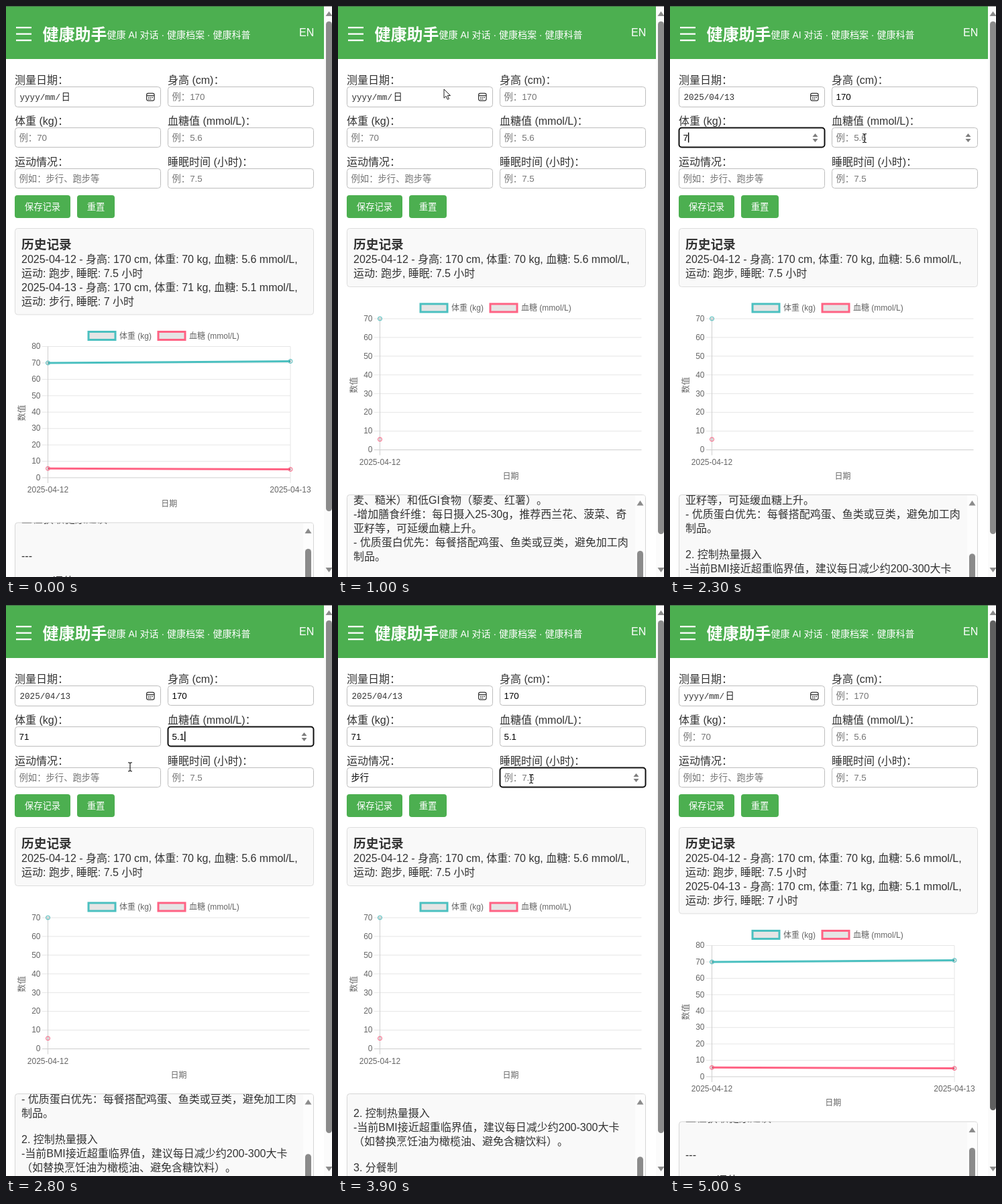
These frames come from a looping animation (486x851 px, 5200 ms). An HTML page:

```html
<!DOCTYPE html>
<html lang="zh-CN">
<head>
<meta charset="utf-8">
<title>健康助手</title>
<style>
html, body { margin: 0; width: 100%; height: 100%; overflow: hidden; background: #fff; }
svg { display: block; font-family: "Liberation Sans", Arial, "Noto Sans CJK SC", "Noto Sans CJK", sans-serif; }
text { white-space: pre; text-spacing-trim: space-all; }
.mono { font-family: "Liberation Mono", "Noto Sans CJK SC", monospace; }
</style>
</head>
<body>
<svg id="stage" width="486" height="851" viewBox="0 0 486 851"></svg>
<script>
const LOOP = 5200, SAVED = 4400;
const GREEN = '#4CAF50', TEAL = '#4BC0C0', PINK = '#FF6384';
const stage = document.getElementById('stage');

function add(parent, tag, attrs = {}, content) {
  const node = document.createElementNS('http://www.w3.org/2000/svg', tag);
  for (const key in attrs) node.setAttribute(key, attrs[key]);
  if (content !== undefined) node.textContent = content;
  parent.appendChild(node);
  return node;
}
const group = (parent, attrs) => add(parent, 'g', attrs);
const box = (parent, x, y, width, height, fill, more) =>
  add(parent, 'rect', { x, y, width, height, fill, ...more });
const text = (parent, x, y, str, size = 16, fill = '#333', more) =>
  add(parent, 'text', { x, y, 'font-size': size, fill, ...more }, str);
const path = (parent, d, fill, more) => add(parent, 'path', { d, fill, ...more });
const line = (parent, x1, y1, x2, y2, stroke, width = 1) =>
  add(parent, 'line', { x1, y1, x2, y2, stroke, 'stroke-width': width });
const show = (node, on) => node.setAttribute('display', on ? 'inline' : 'none');
const move = (node, x, y) => node.setAttribute('transform', `translate(${x} ${y})`);
const up = (parent, x, y, w, h, fill) => path(parent, `M${x - w} ${y + h}L${x} ${y}L${x + w} ${y + h}Z`, fill);
const down = (parent, x, y, w, h, fill) => path(parent, `M${x - w} ${y}L${x} ${y + h}L${x + w} ${y}Z`, fill);

// Page header
box(stage, 0, 0, 486, 851, '#fff');
const page = group(stage);
box(page, 0, -2, 474, 81, GREEN);
for (const y of [31, 40.5, 50]) box(page, 15, y, 23, 2.3, '#fff');
text(page, 54.5, 50.5, '健康助手', 24, '#fff', { 'font-weight': 'bold' });
text(page, 150.5, 48, '健康 AI 对话 · 健康档案 · 健康科普', 14, '#fff');
text(page, 437, 45, 'EN', 16, '#fff');

// Form fields
const SMALL = 13.333;
function field(x, y, height, label, hint, spin) {
  const mid = y + height / 2;
  text(page, x, y - 4, label);
  box(page, x + .5, y + .5, 217, height - 1, '#fff', { rx: 4, stroke: '#bdbdbd' });
  const value = text(page, x + 6.5, mid + 4.5, hint, SMALL);
  const ring = box(page, x + .5, y + .5, 217, height - 1, 'none', { rx: 4, stroke: '#101010', 'stroke-width': 2 });
  const caret = box(page, 0, mid - 7.5, 1.4, 15, '#000');
  const arrows = group(page);
  if (spin) {
    box(arrows, x + 199, y + 3, 12, height - 6, '#fff');
    up(arrows, x + 203.5, mid - 6, 4, 5, '#7d7d7d');
    down(arrows, x + 203.5, mid + 2, 4, 5, '#7d7d7d');
  }
  return { x, hint, value, ring, caret, arrows };
}
const date = field(13, 120, 31, '测量日期：', '');
date.value.setAttribute('class', 'mono');
date.value.setAttribute('font-size', 12.6);
date.value.setAttribute('x', 20.5);
date.value.setAttribute('y', 139.5);
date.value.setAttribute('fill', '#333');
const dayHint = text(page, 82.5, 140, '日', SMALL, '#222');
const icon = group(page, { stroke: '#333', fill: 'none', 'stroke-width': 1.2 });
box(icon, 209.6, 130.1, 11.5, 11, 'none', { rx: 2.5 });
path(icon, 'M209.6 133.6h11.5M212 136.3h1.6M214.7 136.3h1.6M217.4 136.3h1.6M212 138.7h1.6M214.7 138.7h1.6', 'none');

const height = field(241, 120, 30, '身高 (cm)：', '例：170', true);
const weight = field(13, 181, 30, '体重 (kg)：', '例：70', true);
const sugar = field(241, 181, 30, '血糖值 (mmol/L)：', '例：5.6', true);
const sport = field(13, 242, 30, '运动情况：', '例如：步行、跑步等');
const sleep = field(241, 242, 30, '睡眠时间 (小时)：', '例：7.5', true);
const dots = line(page, 20, 263.5, 35, 263.5, '#333');
dots.setAttribute('stroke-dasharray', '1.5 1.5');

for (const [x, w, label] of [[13, 83, '保存记录'], [106, 56, '重置']]) {
  box(page, x, 282, w, 34, GREEN, { rx: 4 });
  text(page, x + w / 2, 304, label, SMALL, '#fff', { 'text-anchor': 'middle' });
}

// History, chart and advice panel for one set of records
const GAP = 18, ROW = 21;
const clips = add(stage, 'defs');
function report({ id, history, shift, max, right, names, weights, sugars, advice, first }) {
  const g = group(page);
  box(g, 13.5, 331.5, 445, 87 + shift, '#f9f9f9', { rx: 4, stroke: '#ddd' });
  text(g, 23, 362, '历史记录', 18.72, '#333', { 'font-weight': 'bold' });
  history.forEach((str, i) => text(g, 23, 383.3 + i * 20.8, str));

  const chart = group(g);
  move(chart, 0, shift);
  const grey = '#666', mid = { 'text-anchor': 'middle' };
  for (const [x, color, label] of [[122, TEAL, '体重 (kg)'], [226, PINK, '血糖 (mmol/L)']]) {
    box(chart, x + 1, 444, 40, 12, '#e5e5e5', { stroke: color, 'stroke-width': 3 });
    text(chart, x + 47, 454, label, 12, grey);
  }
  const base = 661.5, top = 466, left = 62.5;
  const yOf = v => base - v * (base - top) / max;
  for (let v = 0; v <= max; v += 10) {
    const y = yOf(v);
    line(chart, 54, y, right, y, v ? '#e6e6e6' : '#cfcfcf');
    text(chart, 51.5, y + 3.8, v, 12, grey, { 'text-anchor': 'end' });
  }
  line(chart, left, top, left, base + 8, '#cfcfcf');
  const xs = [left, 424];
  if (names.length > 1) line(chart, 424, top, 424, base + 8, '#e6e6e6');
  names.forEach((name, i) => text(chart, xs[i], 683.5, name, 12, grey, mid));
  text(chart, (left + right) / 2, 704.5, '日期', 12, grey, mid);
  text(chart, 0, 0, '数值', 12, grey, { ...mid, transform: 'translate(27.5 565) rotate(-90)' });
  for (const [color, values] of [[PINK, sugars], [TEAL, weights]]) {
    if (values.length > 1) line(chart, xs[0], yOf(values[0]), xs[1], yOf(values[1]), color, 3);
    values.forEach((v, i) => add(chart, 'circle',
      { cx: xs[i], cy: yOf(v), r: 3, fill: 'rgba(0,0,0,.1)', stroke: color }));
  }

  const panelTop = 728 + shift;
  box(g, 13.5, panelTop + .5, 445, 220, '#f9f9f9', { rx: 4, stroke: '#d6d6d6' });
  box(g, 443, panelTop + 1.5, 14.5, 200, '#fdfdfd');
  up(g, 450.5, panelTop + 9, 5, 7.5, '#8b8b8b');
  const thumb = box(g, 446, 0, 9, 200, '#8b8b8b', { rx: 4.5 });
  box(add(clips, 'clipPath', { id }), 14, panelTop + 1, 429, 200);
  const scroller = group(group(g, { 'clip-path': `url(#${id})` }));
  let y = first;
  for (const str of advice) {
    const h = /[^\x00-\x7f]/.test(str) ? ROW : GAP;
    if (str) text(scroller, 23, y + h / 2 + 5.6, str);
    y += h;
  }
  return { g, thumb, scroller };
}
const day1 = ['2025-04-12 - 身高: 170 cm, 体重: 70 kg, 血糖: 5.6 mmol/L,', '运动: 跑步, 睡眠: 7.5 小时'];
const day2 = ['2025-04-13 - 身高: 170 cm, 体重: 71 kg, 血糖: 5.1 mmol/L,', '运动: 步行, 睡眠: 7 小时'];
const before = report({
  id: 'clipA', history: day1, shift: 0, max: 70, right: 452.5,
  names: ['2025-04-12'], weights: [70], sugars: [5.6], first: 683.5,
  advice: [
    '1. 优化饮食结构',
    '- 选择低升糖主食：用全谷物代替精米白面（如燕',
    '麦、糙米）和低GI食物（藜麦、红薯）。',
    '-增加膳食纤维：每日摄入25-30g，推荐西兰花、菠菜、奇',
    '亚籽等，可延缓血糖上升。',
    '- 优质蛋白优先：每餐搭配鸡蛋、鱼类或豆类，避免加工肉',
    '制品。',
    '',
    '2. 控制热量摄入',
    '-当前BMI接近超重临界值，建议每日减少约200-300大卡',
    '（如替换烹饪油为橄榄油、避免含糖饮料）。',
    '',
    '3. 分餐制',
    '- 采用少食多餐的方式，避免一次进食过量'
  ]
});
const after = report({
  id: 'clipB', history: day1.concat(day2), shift: 41.5, max: 80, right: 424,
  names: ['2025-04-12', '2025-04-13'], weights: [70, 71], sugars: [5.6, 5.1], first: 774.5,
  advice: ['正在获取健康建议...', '', '', '---', '', '1. BMI评估']
});

// Window scrollbar and edge
box(stage, 474, 0, 12, 851, '#fbfbfb');
up(stage, 481.5, 8, 5, 7, '#8b8b8b');
down(stage, 481.5, 837, 5, 7, '#8b8b8b');
const bar = box(stage, 477, 23, 9, 730, '#8b8b8b', { rx: 4.5 });
box(stage, 0, 0, 486, 1, '#444', { opacity: .6 });

// Candidate window of the input method, above everything but the pointer
const ime = group(stage);
for (let i = 4; i > 0; i--) box(ime, 19 - i, 266 - i, 500, 34 + i * 2, '#000', { rx: 8 + i, opacity: .06 });
box(ime, 19, 264.5, 500, 34.5, '#2b2b2b', { rx: 7 });
box(ime, 24, 269, 62, 27, '#3a3a3a', { rx: 4 });
box(ime, 24, 274.5, 3, 16, '#4cc2d8', { rx: 1.5 });
[...'不步部补 布卜'].forEach((char, i) => {
  const x = 35 + i * 66.2;
  text(ime, x, 289, i + 1, 15, '#eee');
  text(ime, x + 13, 289, char, 15, '#eee');
});
path(ime, 'M317.5 282a5 5.5 0 0 1 10 0q-.5 3 2 4.500q1 4 -3 4q-4 1.500 -8 0q-4 0 -3 -4q2.500 -1.500 2 -4.500Z', '#ee7f3b');

// Pointers
const arrow = group(stage);
path(arrow, 'M0 0V13.2L3.1 10.3L5.3 15.3L7.5 14.3L5.3 9.5H9.5Z', '#fff', { stroke: '#222', 'stroke-linejoin': 'round' });
const beam = group(stage);
path(beam, 'M-3 -6.5Q0 -6.5 0 -5V5Q0 6.5 -3 6.5M3 -6.5Q0 -6.5 0 -5M0 5Q0 6.5 3 6.5', 'none', { stroke: '#222', 'stroke-width': 1.2 });

// Timelines: [time, value]
const typed = [
  [height, [[1600, '1'], [1700, '17'], [1800, '170']]],
  [weight, [[2300, '7'], [2400, '71']]],
  [sugar, [[2600, '5'], [2700, '5.'], [2800, '5.1']]],
  [sport, [[3200, 'bu'], [3500, '步行']]],
  [sleep, [[4000, '7']]]
];
const dates = [[0, 'yyyy/mm/'], [1300, '2025/mm/'], [1400, '2025/04/'], [1500, '2025/04/13'], [SAVED, 'yyyy/mm/']];
const focus = [[0, null], [1600, height], [2000, weight], [2500, sugar], [2900, sport], [3800, sleep], [4200, null]];
const scroll = [[0, -21], [300, 0], [1400, 21], [2100, 42], [2600, 63], [2900, 84], [3200, 100], [3300, 102]];
const track = [
  [600, 300, 330], [800, 158, 124], [1000, 158, 124], [1300, 40, 132], [1500, 60, 134], [1600, 300, 136], [1800, 300, 136],
  [2000, 90, 197], [2200, 290, 197], [2500, 290, 197], [2900, 150, 256], [3100, 203.5, 261.5], [3500, 203.5, 261.5],
  [3800, 288, 259], [4000, 288, 259], [4200, 60, 300], [4600, 60, 300], [4700, 243.5, 440], [4800, 243.5, 440]
];
const last = (steps, t, none) => steps.reduce((v, s) => s[0] <= t ? s[1] : v, none);

function pointer(t) {
  const on = t >= track[0][0] && t < 4900;
  let i = 0;
  while (i < track.length - 2 && track[i + 1][0] <= t) i++;
  const [a, ax, ay] = track[i], [b, bx, by] = track[i + 1];
  const k = Math.min(1, Math.max(0, (t - a) / (b - a)));
  const x = ax + (bx - ax) * k, y = ay + (by - ay) * k;
  const inField = (t >= 1600 && t < 1900) || (t >= 2000 && t < 3100) || (t >= 3600 && t < 4100);
  show(arrow, on && !inField);
  show(beam, on && inField);
  move(arrow, x, y);
  move(beam, x, y);
}

function render(time) {
  const t = Math.floor(time % LOOP / 100) * 100;
  const saved = t < 100 || t >= SAVED;
  const active = last(focus, t);

  date.value.textContent = last(dates, t);
  show(date.ring, t >= 1200 && t < 1600);
  show(date.caret, false);
  show(dayHint, t < 1500 || saved);

  for (const [f, steps] of typed) {
    const value = saved ? '' : last(steps, t, '');
    const on = f === active;
    f.value.textContent = value || f.hint;
    f.value.setAttribute('fill', value ? '#000' : '#757575');
    show(f.ring, on);
    show(f.caret, on && value);
    if (on && value) f.caret.setAttribute('x', f.x + 6.5 + f.value.getComputedTextLength());
    show(f.arrows, on || (f === sugar && t >= 2200 && t < 2900));
  }
  const composing = t >= 3200 && t < 3500;
  show(ime, composing);
  show(dots, composing);

  show(before.g, !saved);
  show(after.g, saved);
  const s = last(scroll, t);
  move(before.scroller, 0, -s);
  before.thumb.setAttribute('y', 812 + s * .1);
  const streamed = t < 100 || t >= 4900;
  move(after.scroller, 0, streamed ? -ROW : 0);
  after.thumb.setAttribute('y', streamed ? 809 : 798);

  const nudge = t >= 4700 && t < 4900 ? 1.6 : 0;
  move(page, 0, -nudge);
  bar.setAttribute('y', 23 + nudge);
  bar.setAttribute('height', saved ? 730 : 764);
  bar.setAttribute('fill', t >= 4900 ? '#606060' : '#8b8b8b');
  pointer(t);
}

const start = performance.now();
function tick() {
  render(performance.now() - start);
  requestAnimationFrame(tick);
}
tick();
</script>
</body>
</html>
```
